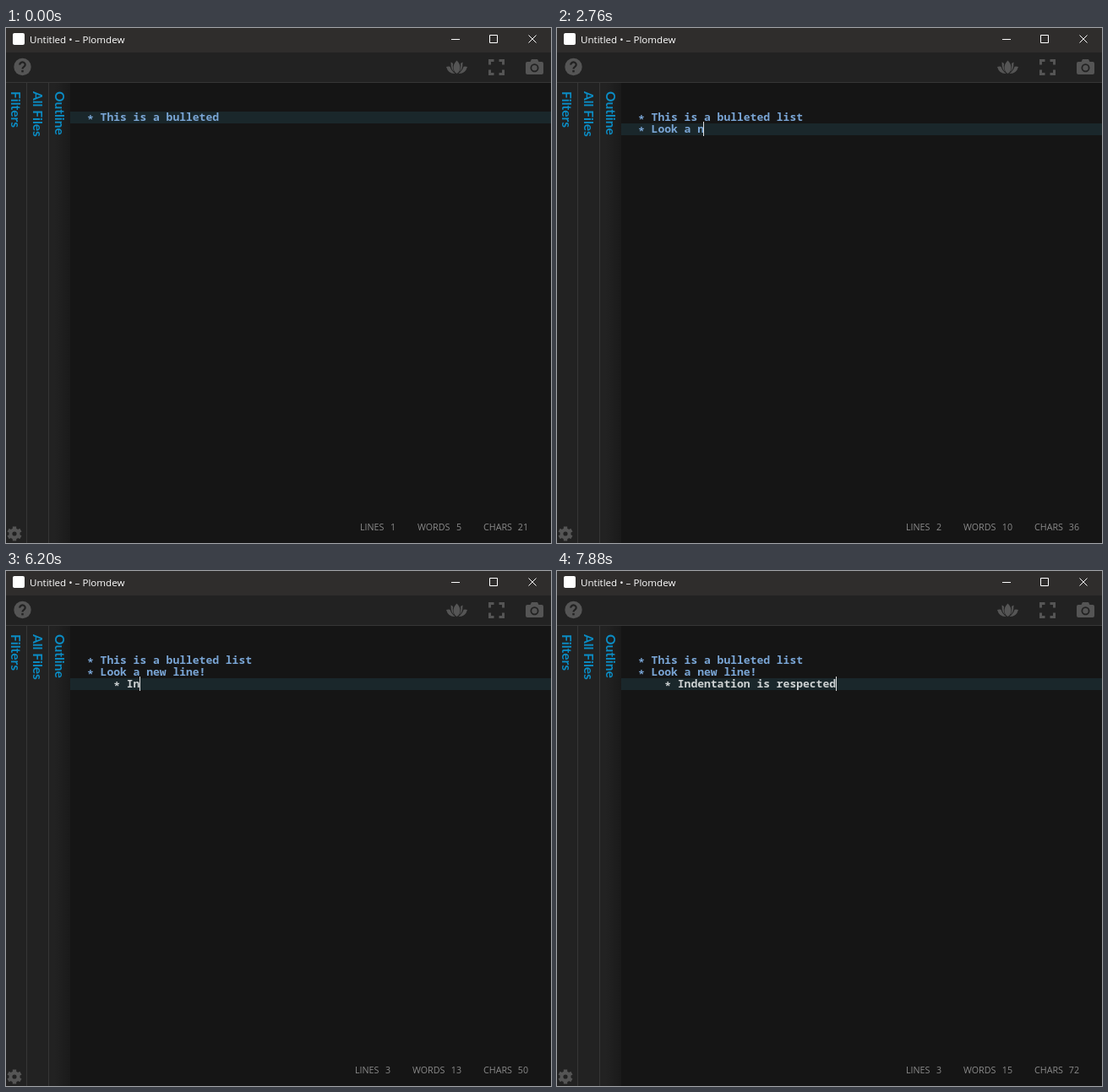
Recreate the animation shown at these times as an HTML page. Size 645 px wide and 610 px high, loop 7.99 s.

```html
<!DOCTYPE html>
<html>
<head>
<meta charset="utf-8">
<style>
  html, body { margin: 0; width: 100%; height: 100%; overflow: hidden; background: #151515; }
  svg { display: block; }
  .title { font: 11.6px "Open Sans", sans-serif; fill: #fff; }
  .tab { font: bold 15.5px Lato, sans-serif; fill: #0b8cc4; }
  .code { font: 600 13px "Noto Sans Mono", monospace; white-space: pre; }
  .stat { font: 10.7px "Open Sans", sans-serif; fill: #8a8a8a; }
  .icon { fill: #555; }
  .win { fill: none; stroke: #fff; }
</style>
</head>
<body>
<svg width="645" height="610" viewBox="0 0 645 610">
  <defs>
    <linearGradient id="shade"><stop offset=".3" stop-color="#222"/><stop offset="1" stop-color="#1a1a1a"/></linearGradient>
  </defs>

  <!-- title bar -->
  <rect width="645" height="29" fill="#2f2d2c"/>
  <rect x="8" y="6" width="14" height="14" rx="2" fill="#fff"/>
  <text class="title" x="28" y="18">Untitled • – Plomdew</text>
  <path class="win" d="M527 13.5h10M572.5 8.5h9v9h-9zM618.5 8.5l9 9m0-9l-9 9"/>

  <!-- toolbar -->
  <rect y="29" width="645" height="36" fill="#222"/>
  <g class="icon">
    <circle cx="19.5" cy="46" r="10.2"/>
    <path d="M533.5 38.5q4 4 4 8.500t-4 7q-4-2.500-4-7t4-8.500z"/>
    <path d="M526.500 40.500q2 .5 2.500 2-1 5 1.500 9.500-4-2.500-4-11.500zM540.500 40.500q-2 .5-2.500 2 1 5-1.500 9.500 4-2.500 4-11.500z"/>
    <path d="M521 46q2-1 4.500-.3 1.500 5 6 8.300-8 .5-10.500-8zM546 46q-2-1-4.500-.3-1.500 5-6 8.300 8 .5 10.500-8z"/>
    <path fill-rule="evenodd" d="M617 40h3.500l1.500-3h7l1.500 3h3.500q2 0 2 2v11q0 2-2 2h-17q-2 0-2-2v-11q0-2 2-2zM625.500 42.300a5 5 0 1 0 .01 0z"/>
    <circle cx="625.500" cy="47.300" r="3.200"/>
  </g>
  <path d="M16.300 43.600a3.200 3 0 1 1 5 2.300q-1.800 1.200-1.800 2.700" fill="none" stroke="#222" stroke-width="2.300"/>
  <rect x="18.300" y="50" width="2.400" height="2.400" fill="#222"/>
  <path d="M572.500 43.500v-5h5M583.500 38.500h5v5M588.500 49.500v5h-5M577.500 54.500h-5v-5" fill="none" stroke="#555" stroke-width="3"/>

  <!-- side tabs -->
  <rect y="65" width="50" height="545" fill="#222"/>
  <rect x="50" y="65" width="26" height="545" fill="url(#shade)"/>
  <path d="M0 64.500h645M24.500 65v545M50.500 65v545" stroke="#363636"/>
  <text class="tab" transform="translate(6 75) rotate(90)">Filters</text>
  <text class="tab" transform="translate(32 75) rotate(90)">All Files</text>
  <text class="tab" transform="translate(58 75) rotate(90)">Outline</text>
  <g transform="translate(10 599)" fill="none" stroke="#555">
    <circle r="4.600" stroke-width="4"/>
    <path d="M0-8.600v3M0 8.600v-3M7.400-4.300l-2.600 1.500M-7.400 4.300l2.600-1.500M7.400 4.300l-2.600-1.500M-7.400-4.300l2.600 1.500" stroke-width="4.400"/>
  </g>

  <!-- editor -->
  <rect id="active" x="76" width="569" height="14" fill="#1a272b"/>
  <g id="lines"></g>
  <rect id="caret" width="1" height="17" fill="#ddd"/>
  <g id="stats"></g>
</svg>
<script>
const LOOP = 7990, LEFT = 96, TOP = 99, CHAR = 7.8, LINE = 14;

// [first ms, last ms, keys]: | blinks the caret, < > move it, ~ is backspace
const runs = [
  [200, 510, '||'], [790, 980, 'list'], [1290, 1290, '|'], [1500, 1500, '\n'],
  [1810, 1810, '|'], [1970, 2290, 'Look '], [2510, 2620, 'a '], [2760, 3310, 'new line!'],
  [3620, 3620, '|'], [3710, 3710, '\n'], [4010, 4010, '|'], [4105, 4200, '<<'],
  [4370, 4370, '\t'], [4620, 4910, '>>'], [5240, 5540, '||'], [5850, 5850, 'i'],
  [6070, 6070, '~'], [6135, 6200, 'In'], [6260, 6510, 'denta'], [6690, 6860, 'tio'],
  [6900, 7430, 'n is '], [7510, 7880, 'respected']
];
const keys = runs.flatMap(([from, to, text]) => [...text].map((key, i) =>
  ({ key, at: from + (to - from) * i / Math.max(1, text.length - 1) })));

const $ = id => document.getElementById(id);
function addText(parent, cls, x, y, str = '') {
  const el = document.createElementNS('http://www.w3.org/2000/svg', 'text');
  el.setAttribute('class', cls);
  set(el, { x, y });
  el.textContent = str;
  return parent.appendChild(el);
}
function set(el, attrs) {
  for (const name in attrs) el.setAttribute(name, attrs[name]);
}

const rows = [0, 1, 2].map(i => {
  const y = TOP + 11 + i * LINE;
  return { star: addText($('lines'), 'code', LEFT, y + 3), body: addText($('lines'), 'code', LEFT, y) };
});
const stats = [['LINES', 419, 461], ['WORDS', 487, 539], ['CHARS', 565, 618]].map(([name, x, end]) => {
  const label = addText($('stats'), 'stat', x, 595, name);
  const value = addText($('stats'), 'stat', end, 595);
  value.setAttribute('text-anchor', 'end');
  return { label, value, x, end };
});

function stateAt(t) {
  let text = '* This is a bulleted ', pos = text.length, on = false;
  for (const { key, at } of keys) {
    if (at > t) break;
    if (key === '|') { on = !on; continue; }
    on = true;
    if (key === '<') pos--;
    else if (key === '>') pos++;
    else if (key === '~') {
      text = text.slice(0, pos - 1) + text.slice(pos);
      pos--;
    } else {
      const added = key === '\n' ? '\n* ' : key;
      text = text.slice(0, pos) + added + text.slice(pos);
      pos += added.length;
    }
  }
  return { text, pos, on };
}

function draw(t) {
  const { text, pos, on } = stateAt(t);
  const lines = text.split('\n');
  rows.forEach(({ star, body }, i) => {
    const line = lines[i] || '', indent = line[0] === '\t' ? 4 : 0;
    const fill = indent ? '#cfd3d4' : '#7aa6d6';
    star.textContent = line ? '*' : '';
    body.textContent = line.trimStart().slice(2);
    set(star, { x: LEFT + indent * CHAR, fill });
    set(body, { x: LEFT + (indent + 2) * CHAR, fill });
  });

  const before = text.slice(0, pos).split('\n'), row = before.length - 1;
  const col = before[row].replace('\t', '    ').length;
  const nudge = before[row][0] === '\t' && col > 4 ? 0 : 1;
  set($('active'), { y: TOP + row * LINE });
  set($('caret'), {
    x: Math.max(LEFT, Math.round(LEFT + col * CHAR) - nudge),
    y: TOP - 2 + row * LINE,
    visibility: on ? 'visible' : 'hidden'
  });

  const counts = [lines.length, text.trim().split(/\s+/).length, text.length];
  stats.forEach(({ label, value, x, end }, i) => {
    const shift = i < 2 && counts[1] > 9 ? 6 : 0;
    set(label, { x: x - shift });
    set(value, { x: end - (i ? 0 : shift) });
    value.textContent = counts[i];
  });
}

const start = performance.now();
function tick() {
  draw((performance.now() - start) % LOOP);
  requestAnimationFrame(tick);
}
draw(0);
tick();
</script>
</body>
</html>
```
